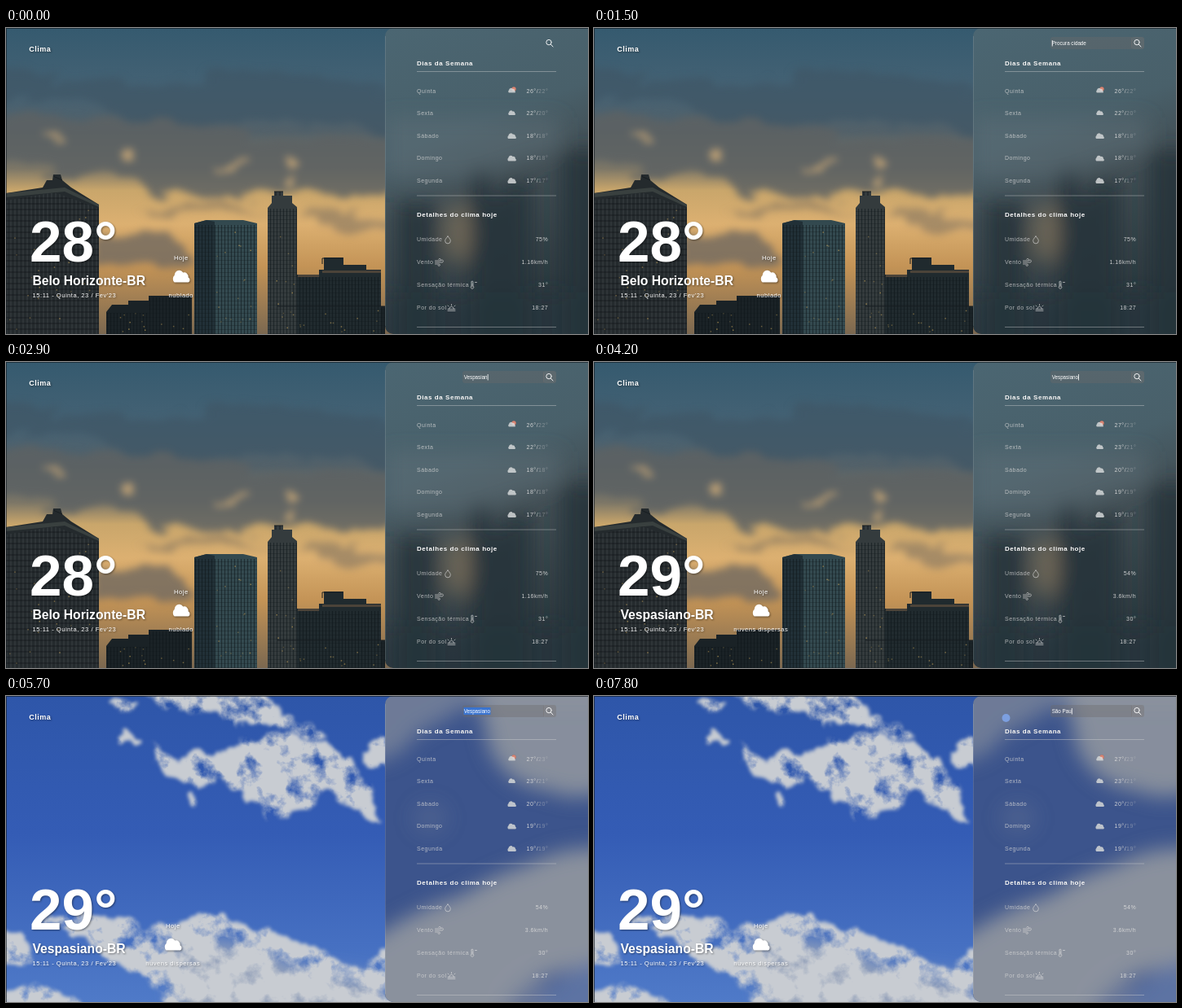
These frames come from a looping animation (714x376 px, 8000 ms). An HTML page:

```html
<!DOCTYPE html>
<html lang="pt">
<head>
<meta charset="utf-8">
<title>Clima</title>
<style>
html, body { margin: 0; width: 100%; height: 100%; overflow: hidden; background: #10181c; }
svg { display: block; }
#stage { width: 100vw; height: 100vh; }
text { font-family: "Liberation Sans", Arial, sans-serif; fill: #fff; white-space: pre; }
.title { font-weight: bold; font-size: 9px; letter-spacing: .5px; }
.temp { font-weight: bold; font-size: 71px; }
.city { font-weight: bold; font-size: 15.7px; }
.note { font-size: 7.6px; letter-spacing: .5px; }
.head { font-weight: bold; font-size: 8px; letter-spacing: .55px; }
.row { font-size: 7px; letter-spacing: .5px; opacity: .66; }
.value { opacity: .78; text-anchor: end; }
.low { fill-opacity: .45; }
.mid { text-anchor: middle; }
.input { font-size: 6.27px; }
.shadow { filter: drop-shadow(1px 1px 1px rgba(0, 0, 0, .42)); }
.soft { filter: drop-shadow(.5px .5px .5px rgba(0, 0, 0, .3)); }
.line { stroke: #fff; stroke-opacity: .34; }
.icon { fill: none; stroke: #fff; stroke-width: .75; stroke-linecap: round; opacity: .75; }
.day { animation: day 8s step-end infinite; }
.field { animation: slide 8s infinite; }
.button { animation: hover 8s infinite; }
.popup { animation: popup 8s step-end infinite; }
@keyframes day { 0% { visibility: hidden; } 55%, 100% { visibility: visible; } }
@keyframes slide {
  0%, 1.25% { transform: translateX(102px); animation-timing-function: ease; }
  15%, 100% { transform: none; }
}
@keyframes hover { 0%, 1.25% { opacity: 0; } 8%, 100% { opacity: 1; } }
@keyframes popup { 0% { visibility: hidden; } 72.5%, 100% { visibility: visible; } }
</style>
</head>
<body>
<svg id="stage" viewBox="0 0 714 376" preserveAspectRatio="none">
  <defs>
    <linearGradient id="duskSky" x2="0" y2="1">
      <stop offset="0" stop-color="#355a6f"/><stop offset=".2" stop-color="#456274"/>
      <stop offset=".34" stop-color="#536169"/><stop offset=".46" stop-color="#7d7767"/>
      <stop offset=".53" stop-color="#c9a66b"/><stop offset=".64" stop-color="#dcb071"/>
      <stop offset=".78" stop-color="#c39356"/><stop offset="1" stop-color="#7b6850"/>
    </linearGradient>
    <linearGradient id="daySky" x2="0" y2="1">
      <stop offset="0" stop-color="#2e56a9"/><stop offset=".45" stop-color="#345cb5"/>
      <stop offset="1" stop-color="#4f7ac8"/>
    </linearGradient>
    <linearGradient id="duskGlass" x2=".25" y2="1">
      <stop offset="0" stop-color="#4b6672"/><stop offset=".4" stop-color="#49606a"/>
      <stop offset=".6" stop-color="#424f55"/><stop offset="1" stop-color="#2c383e"/>
    </linearGradient>
    <filter id="cloudy" x="-5%" y="-10%" width="110%" height="120%" color-interpolation-filters="sRGB">
      <feTurbulence type="fractalNoise" baseFrequency=".035" numOctaves="5" seed="4" result="noise"/>
      <feDisplacementMap in="SourceGraphic" in2="noise" scale="32" xChannelSelector="R" yChannelSelector="G"/>
      <feGaussianBlur stdDeviation="2" result="shape"/>
      <feColorMatrix in="noise" values="0 0 0 0 1  0 0 0 0 1  0 0 0 0 1  0 0 3.6 0 -.85"/>
      <feComposite in="shape" operator="in"/>
    </filter>
    <filter id="smoky" x="-5%" y="-20%" width="110%" height="140%" color-interpolation-filters="sRGB">
      <feTurbulence type="fractalNoise" baseFrequency=".014 .035" numOctaves="4" seed="8"/>
      <feDisplacementMap in="SourceGraphic" scale="45" xChannelSelector="R" yChannelSelector="G"/>
      <feGaussianBlur stdDeviation="5"/>
    </filter>
    <filter id="frost" x="-30%" y="-30%" width="160%" height="160%"><feGaussianBlur stdDeviation="12"/></filter>
    <pattern id="panes" width="4" height="5" patternUnits="userSpaceOnUse">
      <path d="M0 0H4M.5 0V5" stroke="#0c1418" stroke-opacity=".55"/>
    </pattern>
    <pattern id="ribs" width="5" height="7" patternUnits="userSpaceOnUse">
      <path d="M1 0V7" stroke="#596061" stroke-opacity=".4"/><path d="M0 6H5" stroke="#0b0f12" stroke-opacity=".6"/>
    </pattern>
    <clipPath id="left"><path d="M0 0H480V376H0Z"/></clipPath>
    <clipPath id="panel"><rect x="465" width="270" height="376" rx="10"/></clipPath>
    <path id="cloud" d="M3 10A3 3 0 0 1 3 5A4.2 4.2 0 0 1 10.5 3A3.4 3.4 0 0 1 15 6.4A1.9 1.9 0 0 1 15 10Z"/>
  </defs>

  <g class="dusk">
    <g clip-path="url(#left)">
      <path fill="url(#duskSky)" d="M0 0H480V376H0Z"/>
      <g filter="url(#smoky)">
        <path fill="#3f5665" opacity=".7" d="M-20 50Q120 75 220 58T490 80V122Q400 110 300 118T100 98T-20 110Z"/>
        <path fill="#5d6263" opacity=".85" d="M-20 112Q150 104 260 124T490 118V198Q420 210 380 196Q290 214 230 202Q150 186 90 180Q40 164 -20 164Z"/>
        <path fill="#766d61" opacity=".85" d="M110 250Q150 262 195 258Q230 270 240 288Q190 302 110 292Z"/>
        <path fill="#82745f" opacity=".6" d="M360 232Q420 222 480 238V250Q400 252 360 232ZM150 218Q240 206 320 222Q240 232 150 218Z"/>
        <g fill="#ddb57b" opacity=".7">
          <ellipse cx="62" cy="140" rx="13" ry="3"/><ellipse cx="152" cy="152" rx="9" ry="4"/>
          <ellipse cx="350" cy="166" rx="10" ry="5"/><ellipse cx="346" cy="186" rx="9" ry="3"/>
          <ellipse cx="275" cy="168" rx="17" ry="3"/>
        </g>
      </g>
      <g id="city">
        <path fill="#242a2d" d="M0 203L45 196L50 187H57L58 180H67L69 187L80 196L114 217V376H0Z"/>
        <path fill="url(#ribs)" d="M0 212L60 202L114 222V376H0Z"/>
        <path fill="#39403f" d="M0 203L72 196L114 217V220L72 201L0 208Z"/>
        <path fill="#1a2226" d="M123 349L130 340H150V335H175V329H228V376H123ZM333 342H465V376H333Z"/>
        <path fill="#33494f" d="M231 240L246 236H291L308 240V376H231Z"/>
        <path fill="#213037" d="M231 240L246 236L256 238V376H231Z"/>
        <path fill="#343b3d" d="M321 221L326 215V206H329V201H340V206H351V215L357 220V376H321Z"/>
        <path fill="#202a2e" d="M357 303H384V297H390V282H414V291H442V297H460V376H357Z"/>
        <path fill="#4b4339" d="M388 298H460V301H388ZM358 303H384V306H358Z"/>
        <path fill="url(#panes)" d="M231 242H308V376H231ZM321 222H357V376H321ZM123 350H228V376H123ZM175 331H228V376H175ZM357 306H460V376H357ZM333 344H465V376H333Z"/>
        <path fill="none" stroke="#171d20" d="M329 201H340M331 206V201M336 206V201M58 182L69 187M388 290V283H413M333 342H465"/>
      </g>
    </g>
    <g clip-path="url(#panel)">
      <path fill="url(#duskGlass)" d="M465 0H714V376H465Z"/>
      <g filter="url(#frost)">
        <path fill="#26343b" opacity=".85" d="M480 215H527V400H480ZM570 172H592V205H612V190H645V400H570ZM682 150H740V400H682Z"/>
        <path fill="#26343b" opacity=".6" d="M460 325H740V400H460Z"/>
        <ellipse cx="554" cy="252" rx="15" ry="38" fill="#8a785e" opacity=".65"/>
        <path fill="#62727b" opacity=".45" d="M465 110H680V150L560 185H465Z"/>
      </g>
    </g>
  </g>

  <g class="day">
    <g clip-path="url(#left)">
      <path fill="url(#daySky)" d="M0 0H480V376H0Z"/>
      <path fill="#95a2ba" filter="url(#frost)" d="M195 300Q300 295 360 335L465 350V400H215Q205 340 195 300Z"/>
      <g fill="#c8ccd2" filter="url(#cloudy)">
        <path d="M168 -10H320Q318 10 345 24Q385 40 392 52Q350 52 318 36Q280 34 262 24Q225 16 196 12Q176 6 168 -10Z"/>
        <path d="M180 54Q190 74 212 78Q250 64 282 60Q310 46 340 52Q372 50 396 64Q428 78 442 104Q456 130 453 156Q436 146 412 122Q396 112 384 124Q376 136 360 146Q345 152 329 142Q305 140 288 120Q268 104 249 104Q210 108 190 90Q180 76 180 54Z"/>
        <path d="M440 60Q452 48 490 54V98Q444 92 440 60Z"/>
        <ellipse cx="149" cy="53" rx="15" ry="7"/><ellipse cx="140" cy="12" rx="16" ry="6"/><ellipse cx="229" cy="127" rx="6" ry="8"/>
        <path d="M-20 294Q14 284 26 302Q34 320 22 332Q8 330 -20 336Z"/>
        <path d="M40 272Q90 262 130 272Q150 288 172 292Q182 278 205 280Q225 268 250 276Q285 272 298 292Q320 284 340 296Q362 288 378 320Q395 322 412 326Q440 345 448 322Q455 312 490 314V400H205Q190 352 160 340Q130 330 110 310Q80 290 40 272Z"/>
        <path d="M-20 366Q40 356 80 368L120 400H-20Z"/>
      </g>
    </g>
    <g clip-path="url(#panel)">
      <path fill="#3c548c" d="M465 0H714V376H465Z"/>
      <g filter="url(#frost)" fill="#8f959f">
        <path d="M440 -30H740V15H560Q530 35 505 45Q485 80 440 82Z" opacity=".6"/>
        <path d="M575 -30H740V115Q700 132 665 116Q612 110 592 62Q585 20 575 -30Z" opacity=".9"/>
        <path d="M440 305Q500 262 560 245Q600 218 640 208Q690 180 750 190V330Q690 330 650 350Q620 370 600 410H440Z" opacity=".95"/>
        <path fill="#6077a6" d="M640 410Q650 345 740 320V410Z" opacity=".9"/>
        <path fill="#8890a0" d="M590 410Q600 340 660 325V410Z" opacity=".5"/>
        <ellipse cx="520" cy="150" rx="22" ry="20" opacity=".18"/>
      </g>
    </g>
  </g>
  <path fill="none" stroke="#fff" stroke-opacity=".12" d="M465.5 10V366"/>
  <path fill="#0f171c" fill-opacity=".6" d="M0 0H714V1H1V376H0Z"/>

  <g class="shadow">
    <text class="title" x="28.2" y="29.2">Clima</text>
    <text class="temp" id="temp" x="29" y="287.2"></text>
    <text class="city" id="name" x="32.4" y="316.4"></text>
    <text class="note" x="32.6" y="331.2">15:11 - Quinta, 23 / Fev'23</text>
    <g id="now">
      <text class="note mid" y="285.2">Hoje</text>
      <use href="#cloud" fill="#fff" transform="translate(-12.4 295.5) scale(1.42 1.7)"/>
      <text class="note mid" id="sky" y="331.2"></text>
    </g>
  </g>

  <g class="soft" id="info">
    <text class="head" x="504" y="45.6">Dias da Semana</text>
    <text class="head" x="504" y="232.2">Detalhes do clima hoje</text>
    <path class="line" d="M504 53.5H675M504 206H675M504 367.5H675"/>
    <circle cx="623" cy="75" r="2.7" fill="#d98472"/>
    <g class="icon">
      <path d="M542 256Q538.3 260 538.7 261.6A3.3 3.3 0 0 0 545.3 261.6Q545.7 260 542 256Z"/>
      <path d="M526.5 286H532A1.3 1.3 0 1 0 530.8 284.3M526.5 288H535A1.5 1.5 0 1 0 533.5 286M526.5 290H531A1.2 1.2 0 1 1 530 291.5"/>
      <path d="M571 312V317A1.8 1.8 0 1 0 573 317V312A1 1 0 0 0 571 312M572 314V318M575.5 312.5H577.5"/>
      <path d="M542 347.5H551M543.5 345.5A3 3 0 0 1 549.5 345.5M546.5 341V339.5M543 342L542 341M550 342L551 341M542 345.5H551"/>
    </g>
  </g>

  <svg x="559" y="10" width="101" height="17" viewBox="559 10 101 17">
    <g class="field">
      <rect x="560" y="11" width="108" height="15" rx="3" fill="#6c6a69" fill-opacity=".36"/>
      <rect id="selection" x="561.5" y="14" width="33" height="9" fill="#3a74d0"/>
      <text class="input" id="typed" x="561.7" y="20.7"></text>
      <rect id="caret" y="15" width=".8" height="7.5" fill="#fff"/>
    </g>
  </svg>
  <rect class="button" x="659" y="11" width="16" height="15" rx="3" fill="#777370" fill-opacity=".42"/>
  <path class="icon" style="stroke-width:1;opacity:.9" d="M669.2 17.6A3.2 3.2 0 1 1 662.8 17.6A3.2 3.2 0 1 1 669.2 17.6M668.4 20.2L671 23"/>
  <circle class="popup" cx="505.5" cy="27" r="5" fill="#7c9fe0"/>
</svg>

<script>
const $ = id => document.getElementById(id);
const LOOP = 8000;
const before = {
  temp: '28°', name: 'Belo Horizonte-BR', sky: 'nublado', x: 214.8,
  week: [[26, 22], [22, 20], [18, 18], [18, 18], [17, 17]],
  details: ['75%', '1.16km/h', '31°', '18:27']
};
const after = {
  temp: '29°', name: 'Vespasiano-BR', sky: 'nuvens dispersas', x: 204.8,
  week: [[27, 23], [23, 21], [20, 20], [19, 19], [19, 19]],
  details: ['54%', '3.6km/h', '30°', '18:27']
};

function add(parent, tag, attrs, content = '') {
  const node = document.createElementNS('http://www.w3.org/2000/svg', tag);
  for (const key in attrs) node.setAttribute(key, attrs[key]);
  node.textContent = content;
  return parent.appendChild(node);
}

function addRow(label, y) {
  add($('info'), 'text', { class: 'row', x: 504, y }, label);
  return add($('info'), 'text', { class: 'row value', x: 665.2, y });
}

const highs = ['Quinta', 'Sexta', 'Sábado', 'Domingo', 'Segunda'].map((label, i) => {
  const y = 80 + i * 27.4;
  const scale = i < 2 ? .6 : .72;
  add($('info'), 'use', {
    href: '#cloud', fill: '#dde0e2', opacity: .82,
    transform: `translate(${620.3 - 8.5 * scale} ${y - (i < 2 ? 7 : 6.6)}) scale(${scale} ${scale * 1.1})`
  });
  const value = addRow(label, y);
  return [add(value, 'tspan', {}), add(value, 'tspan', { class: 'low' })];
});
const details = ['Umidade', 'Vento', 'Sensação térmica', 'Por do sol']
  .map((label, i) => addRow(label, 262.2 + i * 28));

// Lit windows, scattered over [x, y, width, height, count] areas
let seed = 7;
const random = () => (seed = seed * 16807 % 2147483647) / 2147483647;
const lit = [[4, 215, 106, 155, 30], [258, 250, 46, 120, 18], [324, 230, 30, 110, 8], [335, 346, 126, 28, 18], [128, 350, 96, 24, 14]];
for (const [x, y, w, h, count] of lit)
  for (let i = 0; i < count; i++)
    add($('city'), 'rect', { x: x + random() * w, y: y + random() * h, width: 1.5, height: 1.5, fill: '#c4a35c', opacity: .25 + random() * .4 });

const typedSoFar = (word, t, start, step) => word.slice(0, Math.max(0, Math.floor((t - start) / step) + 1));
const within = (t, from, to) => t >= from && t < to;
const show = (node, on) => node.setAttribute('visibility', on ? 'visible' : 'hidden');

function render(t) {
  const main = t < 3900 ? before : after;
  for (const key of ['temp', 'name', 'sky']) $(key).textContent = main[key];
  $('now').setAttribute('transform', `translate(${main.x} 0)`);

  const side = t < 4200 ? before : after;
  side.week.forEach(([high, low], i) => {
    highs[i][0].textContent = `${high}°/`;
    highs[i][1].textContent = `${low}°`;
  });
  side.details.forEach((value, i) => details[i].textContent = value);

  const word = t < 6500 ? typedSoFar('Vespasiano', t, 1600, 160) : typedSoFar('São Pau', t, 6500, 210);
  const typed = $('typed');
  typed.textContent = word;
  $('caret').setAttribute('x', 561.8 + (word ? typed.getComputedTextLength() : 0));
  if (!word) typed.textContent = 'Procura cidade';
  const selected = within(t, 5700, 6500);
  show($('selection'), selected);
  show($('caret'), t >= 1300 && !selected && !within(t, 3600, 4200) && !within(t, 4900, 5400));
}

let start;
function tick(now) {
  start ??= now;
  render((now - start) % LOOP);
  requestAnimationFrame(tick);
}
render(0);
requestAnimationFrame(tick);
</script>
</body>
</html>
```
